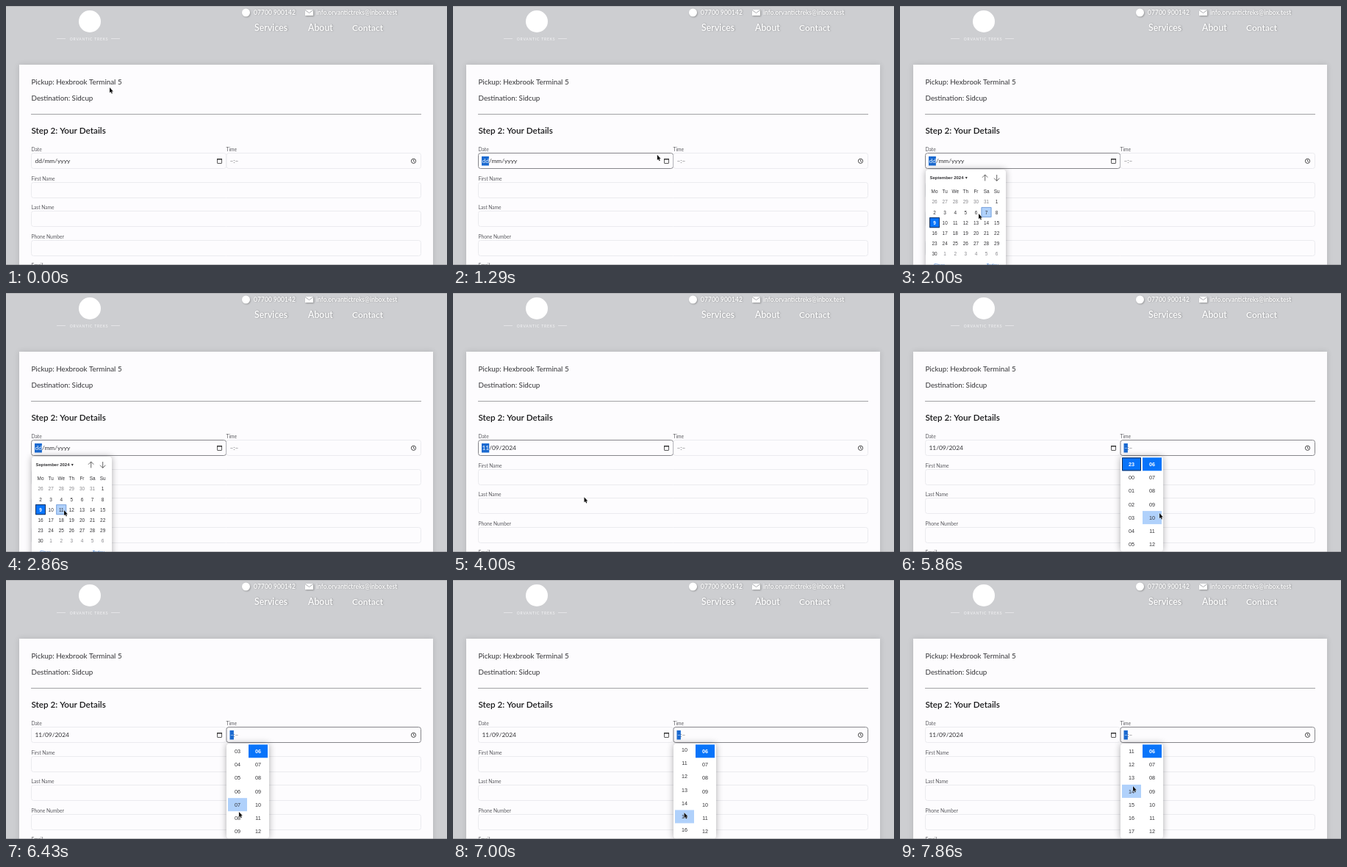
Recreate the animation shown at these times as an HTML page with a canvas. Size 600 by 353 pixels, loop 8000 ms.

```html
<!DOCTYPE html>
<html lang="en">
<head>
<meta charset="utf-8">
<title>Booking form</title>
<style>
  html, body { margin: 0; width: 100%; height: 100%; overflow: hidden; background: #cdced1; }
  canvas { display: block; }
</style>
</head>
<body>
<canvas id="stage" width="600" height="353"></canvas>
<script>
const ctx = document.getElementById('stage').getContext('2d');
const SANS = 'Lato, "Open Sans", sans-serif';
const UI = '"Liberation Sans", Arial, sans-serif';
const INK = '#333336', BLUE = '#0874fa', HOVER = '#b0d1fb', SELECTION = '#1b6ad0', RING = '#14315c';

// Times are counted in steps of the picture.
const STEPS_PER_SECOND = 7, LOOP_STEPS = 56;
const DATE_FOCUS = 9, DATE_OPEN = 10, DATE_CHOSEN = 27, TIME_OPEN = 37;

const pointerStart = { x: 141, y: 111 };
const pointerMoves = [
  { from: 4, to: 11, x: 290, y: 211 },    // date icon
  { from: 11, to: 13.8, x: 107, y: 283 }, // into the calendar
  { from: 14, to: 19, x: 79, y: 296 },    // the 11th
  { from: 27, to: 36, x: 553, y: 211 },   // time icon
  { from: 37, to: 40, x: 353, y: 300 },   // minutes
  { from: 42, to: 46, x: 314.5, y: 317 }, // hours
  { from: 50, to: 54, x: 317, y: 281 }
];

function easeOut(step, from, to) {
  const u = Math.min(1, Math.max(0, (step - from) / (to - from)));
  return u * (2 - u);
}

function pointerAt(step) {
  let { x, y } = pointerStart;
  for (const move of pointerMoves) {
    const u = easeOut(step, move.from, move.to);
    x += (move.x - x) * u;
    y += (move.y - y) * u;
  }
  return { x, y };
}

const hoursScrolled = step => 11.1 * easeOut(step, 44, 49) + 0.9 * easeOut(step, 50, 54);

function text(str, x, y, size, { color = INK, font = SANS, weight = 400, align = 'left' } = {}) {
  ctx.font = `${weight} ${size}px ${font}`;
  ctx.textAlign = align;
  ctx.fillStyle = color;
  ctx.fillText(str, x, y);
}

function rect(x, y, w, h, color) {
  ctx.fillStyle = color;
  ctx.fillRect(x, y, w, h);
}

function outline(x, y, w, h, color, radius = 0, width = 1) {
  ctx.beginPath();
  ctx.roundRect(x, y, w, h, radius);
  ctx.strokeStyle = color;
  ctx.lineWidth = width;
  ctx.stroke();
}

function lines(color, width, ...paths) {
  ctx.strokeStyle = color;
  ctx.lineWidth = width;
  ctx.beginPath();
  for (const path of paths) path.forEach(([x, y], i) => i ? ctx.lineTo(x, y) : ctx.moveTo(x, y));
  ctx.stroke();
}

function disc(x, y, r, color) {
  ctx.beginPath();
  ctx.arc(x, y, r, 0, Math.PI * 2);
  ctx.fillStyle = color;
  ctx.fill();
}

function withShadow(color, blur, offset, draw) {
  ctx.save();
  ctx.shadowColor = color;
  ctx.shadowBlur = blur;
  ctx.shadowOffsetX = ctx.shadowOffsetY = offset;
  draw();
  ctx.restore();
}

function header() {
  rect(0, 0, 600, 353, '#cdced1');
  rect(0, 0, 600, 1, '#b4b5b8');
  disc(114, 21, 15, '#fff');
  ctx.letterSpacing = '0.8px';
  text('ORVANTIC TREKS', 113, 46.5, 5, { color: '#f4f4f6', align: 'center' });
  ctx.letterSpacing = '0px';
  lines('#e9e9ec', 0.8, [[69, 44.5], [81, 44.5]], [[143, 44.5], [155, 44.5]]);

  withShadow('rgba(0,0,0,.3)', 2, 0.8, () => {
    const white = { color: '#fff', weight: 600 };
    text('Services', 338, 33.5, 12.4, white);
    text('About', 411, 33.5, 12.3, white);
    text('Contact', 471, 33.5, 12.1, white);
    text('07700 900142', 337, 11.5, 8.6, white);
    text('info.orvantictreks@inbox.test', 422, 11.5, 8.5, white);
    disc(326.5, 9, 5.5, '#fff');
    rect(407, 5, 11, 8, '#fff');
  });
  lines('#a9aaae', 1, [[407, 5.5], [412.5, 9.5], [418, 5.5]]);
}

function field(x, y, w, focused) {
  outline(x + 0.5, y + 0.5, w - 1, 21, focused ? '#86868b' : '#ebebef', 3);
}

function label(str, x, y) {
  text(str, x, y, 6.7, { color: '#5c5c61' });
}

function selectedText(str, x, y, size) {
  ctx.font = `${size}px ${SANS}`;
  rect(x - 0.5, y - 9, ctx.measureText(str).width + 0.5, 12.5, SELECTION);
  text(str, x, y, size, { color: '#fff' });
}

function dateField(step) {
  const focused = step >= DATE_FOCUS && step < TIME_OPEN;
  const value = step >= DATE_CHOSEN ? '11/09/2024' : 'dd/mm/yyyy';
  field(34, 200, 266, focused);
  text(value, 39.5, 214, 8.4);
  if (focused) selectedText(value.slice(0, 2), 39.5, 214, 8.4);
  outline(287.5, 208.5, 6, 6, '#333', 0.5, 0.8);
  rect(287, 208, 7, 1.5, '#333');
}

function timeField(step) {
  const focused = step >= TIME_OPEN;
  field(299.5, 200, 265.5, focused);
  text('–:–', 304.5, 214, 8.4, { color: '#66666a' });
  if (focused) selectedText('–', 305, 214, 8.4);
  outline(551.4, 208.2, 6.2, 6.2, '#333', 3.1, 0.9);
  lines('#333', 0.8, [[554.5, 209.3], [554.5, 211.5], [556, 212.1]]);
}

function form(step) {
  withShadow('rgba(0,0,0,.12)', 8, 0, () => rect(18, 80, 563, 280, '#fdfcfe'));
  text('Pickup: Hexbrook Terminal 5', 34.5, 106.8, 9.8);
  text('Destination: Sidcup', 34.5, 129, 9.8);
  rect(34, 147, 531, 1, '#a2a2a5');
  text('Step 2: Your Details', 34.5, 174, 11.7, { color: '#18181a', weight: 600 });
  label('Date', 34.5, 197.5);
  label('Time', 299.5, 197.5);
  ['First Name', 'Last Name', 'Phone Number', 'Email'].forEach((name, i) => {
    label(name, 34.5, 238 + i * 39.4);
    field(34, Math.round(240 + i * 39.4), 531, false);
  });
  dateField(step);
  timeField(step);
}

function popup(x, w, h, draw) {
  withShadow('rgba(0,0,0,.32)', 10, 0, () => {
    ctx.beginPath();
    ctx.roundRect(x, 223, w, h, 4);
    ctx.fillStyle = '#fff';
    ctx.fill();
  });
  ctx.save();
  ctx.clip();
  draw();
  ctx.restore();
}

function calendar(hover) {
  const pitch = 14.1, left = 40, top = 260;
  const hoverCol = Math.floor((hover.x - left) / pitch);
  const hoverRow = Math.floor((hover.y - top) / pitch);
  const centred = { font: UI, align: 'center' };
  text('September 2024', 40.5, 236, 6, { font: UI, weight: 700 });
  text('▾', 90.3, 236, 6, centred);
  for (const [x, dir] of [[115.7, -1], [131.7, 1]]) {
    const tip = 234.2 + 4.2 * dir, wing = tip - 3.7 * dir;
    lines('#555', 0.9, [[x, 234.2 - 4.2 * dir], [x, tip]], [[x - 3.7, wing], [x, tip], [x + 3.7, wing]]);
  }
  ['Mo', 'Tu', 'We', 'Th', 'Fr', 'Sa', 'Su'].forEach((name, col) =>
    text(name, left + (col + 0.5) * pitch, 254.5, 6.4, centred));
  for (let i = 0; i < 42; i++) {
    const col = i % 7, row = Math.floor(i / 7);
    const x = left + col * pitch, y = top + row * pitch;
    const date = new Date(2024, 7, 26 + i), day = date.getDate();
    const inMonth = date.getMonth() === 8, today = inMonth && day === 9;
    if (today || (col === hoverCol && row === hoverRow)) {
      rect(x, y, 14, 14, today ? BLUE : HOVER);
      outline(x + 0.5, y + 0.5, 13, 13, today ? RING : '#7fa6dc');
    }
    text(day, x + pitch / 2, y + 9.4, 6.4, {
      ...centred, weight: today ? 700 : 400,
      color: today ? '#fff' : inMonth ? INK : '#88888c'
    });
  }
  text('Clear', 46, 355, 6.2, { font: UI, color: SELECTION });
  text('Today', 117.5, 355, 6.2, { font: UI, color: SELECTION });
}

function timeColumn(x, first, count, scroll, hover, ringed) {
  const pitch = 18.2;
  for (let i = Math.floor(scroll); i < scroll + 8; i++) {
    const y = 233.3 + (i - scroll) * pitch, selected = i === 0;
    const hovered = hover.x >= x - 1 && hover.x < x + 27 && Math.abs(hover.y - y) < pitch / 2;
    if (selected || hovered) rect(x, y - 9, 26, 18, selected ? BLUE : HOVER);
    if (selected && ringed) outline(x + 0.5, y - 8.5, 25, 17, RING);
    text(String((first + i) % count).padStart(2, '0'), x + 13, y + 2.6, 7.2, {
      font: UI, align: 'center', weight: selected ? 700 : 400, color: selected ? '#fff' : INK
    });
  }
}

function pointer({ x, y }) {
  const shape = new Path2D('M0 0V7.2L1.6 5.8L2.8 8.4L3.9 7.9L2.8 5.4H4.9Z');
  ctx.save();
  ctx.translate(x, y);
  ctx.strokeStyle = 'rgba(255,255,255,.8)';
  ctx.lineWidth = 0.8;
  ctx.stroke(shape);
  ctx.fillStyle = '#111';
  ctx.fill(shape);
  ctx.restore();
}

function render(now) {
  // The small lead absorbs rounding at step boundaries.
  const step = Math.floor((now + 4) / 1000 * STEPS_PER_SECOND) % LOOP_STEPS;
  const hover = pointerAt(step - 1); // highlight trails the pointer
  header();
  form(step);
  if (step >= DATE_OPEN && step < DATE_CHOSEN) popup(35, 109, 140, () => calendar(hover));
  if (step >= TIME_OPEN) popup(300, 58, 129.5, () => {
    timeColumn(302, 23, 24, hoursScrolled(step), hover, true);
    timeColumn(330, 6, 60, 0, hover, false);
  });
  rect(0, 352, 600, 1, 'rgba(120,120,124,.45)');
  pointer(pointerAt(step));
}

let start;
function frame(now) {
  start ??= now;
  render(now - start);
  requestAnimationFrame(frame);
}
requestAnimationFrame(frame);
</script>
</body>
</html>
```
